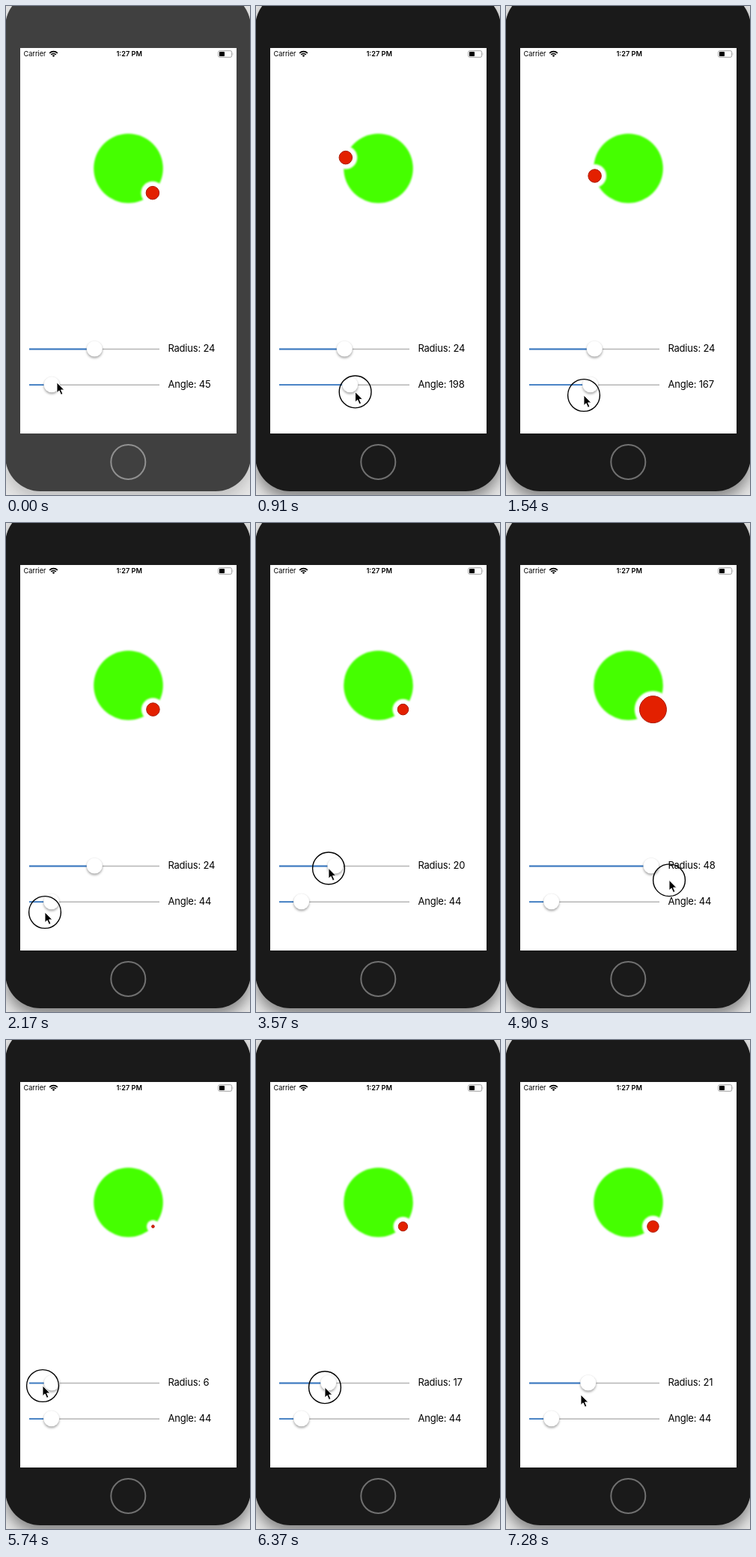
Write an HTML page that moves like this. It is 326x652 px and loops after 7.35 s.

```html
<!DOCTYPE html>
<html lang="en">
<head>
<meta charset="utf-8">
<title>Slider demo</title>
<style>
html, body { margin: 0; height: 100%; overflow: hidden; }
svg { display: block; width: 100vw; height: 100vh; background: #e6e6e6; --bezel: #404040; --ring: #909090; --shade: .16; }
svg.active { --bezel: #1a1a1a; --ring: #707070; --shade: .42; }
text { font: 13px Inter, Roboto, sans-serif; letter-spacing: -.2px; }
.status { font-size: 9.2px; letter-spacing: 0; }
.clock { font-weight: 600; text-anchor: middle; }
#shadow { opacity: var(--shade); }
#bezel { fill: var(--bezel); }
#home { fill: none; stroke: var(--ring); stroke-width: 2; }
.knob { fill: #fff; stroke: #0001; stroke-width: .6; filter: drop-shadow(0 2px 1.5px #0005); }
.rail { stroke: #b5b5b5; stroke-width: 1.6; }
.fill { stroke: #3678c3; stroke-width: 1.8; }
</style>
</head>
<body>
<svg id="stage" viewBox="0 0 326 652">
  <defs>
    <filter id="soft" x="-30%" y="-30%" width="160%" height="160%"><feGaussianBlur stdDeviation="1.1"/></filter>
    <filter id="wide"><feGaussianBlur stdDeviation="9"/></filter>
  </defs>
  <rect id="shadow" x="-1" y="-9" width="328" height="666" rx="47" filter="url(#wide)"/>
  <rect id="bezel" x="-1" y="-19" width="328" height="666" rx="47"/>
  <circle id="home" cx="163.3" cy="608" r="23"/>
  <rect x="19" y="56" width="289" height="514" fill="#fff"/>

  <text class="status" x="23.5" y="67.3">Carrier</text>
  <g fill="none" stroke="#000" stroke-width="1.7">
    <path d="M58.2 62.8A7.5 7.5 0 0 1 68.8 62.8M60.2 64.9A4.7 4.7 0 0 1 66.8 64.9"/>
    <path d="M63.5 68L61.7 66.2A2.5 2.5 0 0 1 65.3 66.2Z" fill="#000" stroke="none"/>
  </g>
  <text class="status clock" x="164.7" y="67.3">1:27 PM</text>
  <rect x="283.7" y="59.7" width="18" height="8.6" rx="2" fill="#fff" stroke="#888" stroke-width=".8"/>
  <rect x="285" y="61" width="7" height="6" rx=".8"/>
  <path d="M302.8 62.3q1.2 1.7 0 3.4z" fill="#888"/>

  <circle cx="163.5" cy="216.5" r="46.3" fill="#44ff00" filter="url(#soft)"/>
  <g id="badge">
    <circle id="halo" fill="#fff" filter="url(#soft)"/>
    <circle id="dot" fill="#e32000" stroke="#ab1b05"/>
  </g>
  <g id="sliders"></g>

  <g id="pointer">
    <circle id="press" r="21.4" fill="none" stroke="#000" stroke-width="1.4"/>
    <path d="M0 0V13.6L3.1 10.8L5.5 16.3L7.9 15.3L5.5 9.9H9.8Z" stroke="#fff" stroke-width=".9"/>
  </g>
</svg>
<script>
const $ = id => document.getElementById(id);
const LOOP = 7350, STEP = 70, MIN_X = 42, SPAN = 152;

// Pointer tracks: time, position
const trackX = [
  [0, 68], [70, 68], [420, 77], [770, 104], [910, 132.6], [1190, 210], [1260, 216],
  [1400, 168], [1540, 104], [1750, 67], [2170, 52], [2660, 52], [3220, 117], [3360, 117],
  [3570, 97], [3780, 69], [3990, 62], [4060, 62], [4480, 130], [4900, 218], [4970, 220],
  [5180, 180], [5600, 68], [5740, 49], [5950, 29], [6370, 92], [6650, 113], [6930, 105],
  [7210, 105], [7280, 100]
];
const trackY = [
  [0, 502], [770, 513], [1540, 519], [2660, 519], [3220, 460],
  [4060, 462], [5040, 477], [5740, 461], [6930, 465], [7210, 465], [7280, 473]
];

// Harmonic mean keeps the curve free of overshoot.
function slope(track, i) {
  const secant = j => track[j] && track[j + 1]
    ? (track[j + 1][1] - track[j][1]) / (track[j + 1][0] - track[j][0]) : 0;
  const a = secant(i - 1), b = secant(i);
  return a * b > 0 ? 2 * a * b / (a + b) : 0;
}

function sample(track, t) {
  const i = track.findLastIndex(k => k[0] <= t);
  const from = track[i], to = track[i + 1];
  if (!to) return from[1];
  const d = to[0] - from[0], u = (t - from[0]) / d, v = 1 - u;
  return v * v * (1 + 2 * u) * from[1] + u * u * (3 - 2 * u) * to[1]
    + d * u * v * (v * slope(track, i) - u * slope(track, i + 1));
}

// Share of the slider for a knob held at an offset from the pointer
function share(t, offset) {
  const x = sample(trackX, t) + offset;
  return Math.min(1, Math.max(0, (x - MIN_X) / SPAN));
}

// The offset changes whenever the pointer overruns an end of the slider.
const angleAt = t => 360 * (t < 1260 ? share(t, -6.9) : share(Math.min(t, 2170), 8.7));

function radiusAt(t) {
  if (t < 3360) return 24.1;
  if (t < 4060) return Math.min(24.1, 48 * share(t, 9));
  return 48 * share(Math.min(t, 6930), t < 4970 ? 9 : t < 5950 ? 12.2 : 4.8);
}

const pressed = t => t >= 70 && t < 2520 || t >= 3290 && t < 7140;

function slider(name, y, max) {
  const g = document.createElementNS("http://www.w3.org/2000/svg", "g");
  g.innerHTML = `<path class="rail" d="M31 ${y + .5}H205"/><path class="fill"/>
    <circle class="knob" cy="${y}" r="10.6"/><text x="216.4" y="${y + 4.2}"></text>`;
  $("sliders").append(g);
  const [, fill, knob, label] = g.children;
  return value => {
    const x = MIN_X + SPAN * value / max;
    fill.setAttribute("d", `M31 ${y + .5}H${x}`);
    knob.setAttribute("cx", x);
    label.textContent = `${name}: ${Math.floor(value)}`;
  };
}

const setRadius = slider("Radius", 457, 48);
const setAngle = slider("Angle", 504.7, 360);
const move = (id, x, y) => $(id).setAttribute("transform", `translate(${x} ${y})`);

function draw(now) {
  const t = Math.floor(now % LOOP / STEP) * STEP;
  const angle = angleAt(t), radius = radiusAt(t);
  const a = angle * Math.PI / 180, r = radius * .385;

  $("stage").classList.toggle("active", t >= 70);
  setRadius(radius);
  setAngle(angle);
  move("badge", 163.5 + 46 * Math.cos(a), 216.5 + 46 * Math.sin(a));
  $("halo").setAttribute("r", r + 6.2);
  $("dot").setAttribute("r", Math.max(0, r - .5));
  $("dot").setAttribute("stroke-width", Math.min(1, r));
  move("pointer", sample(trackX, t), sample(trackY, t));
  $("press").style.display = pressed(t) ? "" : "none";
}

const start = performance.now();
function tick() {
  draw(performance.now() - start);
  requestAnimationFrame(tick);
}
tick();
</script>
</body>
</html>
```
